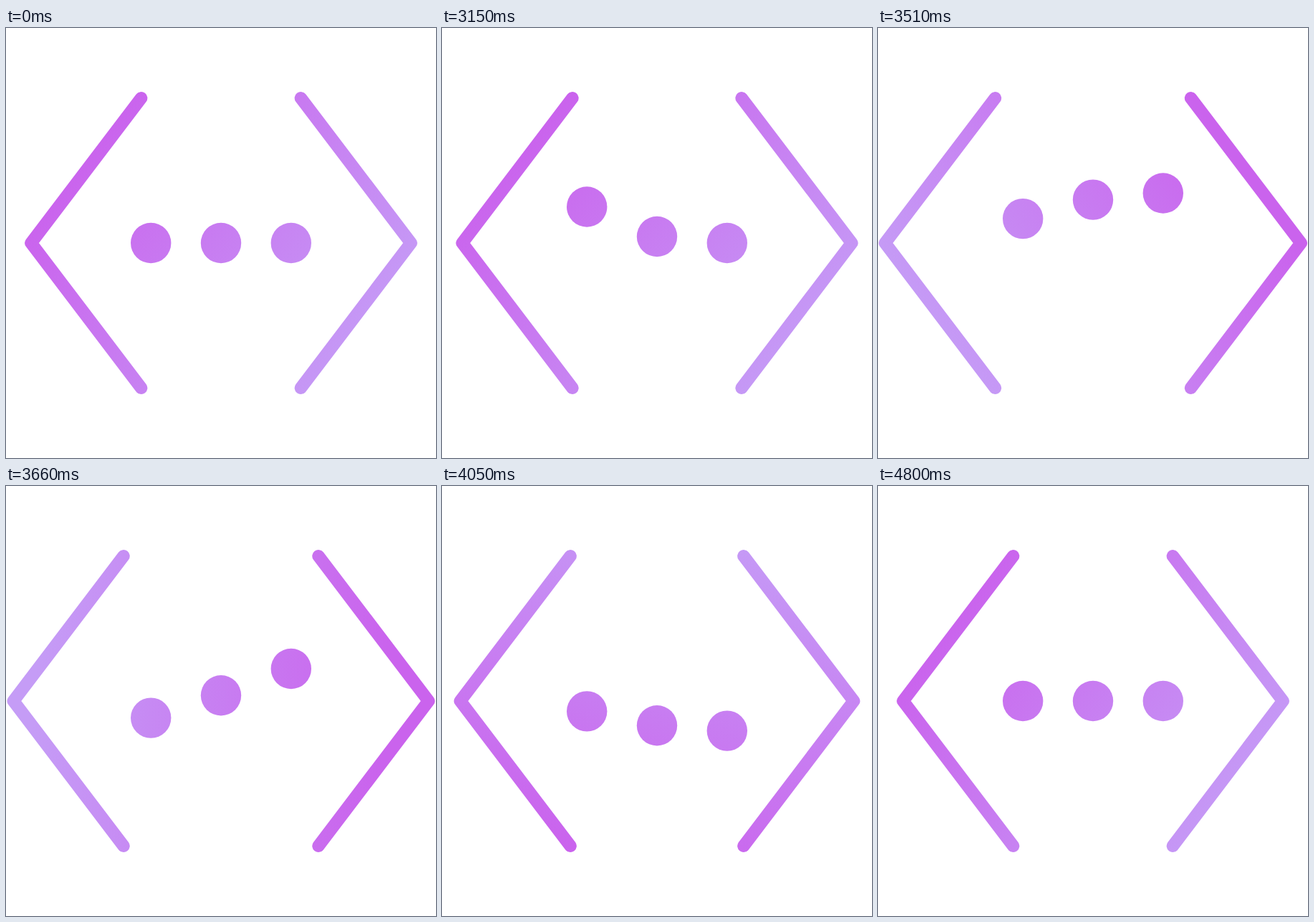
Recreate the animation shown at these times as an HTML page. Size 600 by 600 pixels, loop 4.83 s.

```html
<!DOCTYPE html>
<html lang="en">
<head>
<meta charset="utf-8">
<title>Code brackets</title>
<style>
  html, body { margin: 0; width: 100%; height: 100%; overflow: hidden; background: #fff; }
  svg { display: block; width: 100vw; height: 100vh; }
  path { fill: none; stroke: url(#tint); stroke-width: 17.5; stroke-linecap: round; stroke-linejoin: round; }
  circle { fill: url(#tint); }
</style>
</head>
<body>
<svg viewBox="0 0 600 600">
  <defs>
    <linearGradient id="tint" gradientUnits="userSpaceOnUse" x1="70" y1="300" x2="560" y2="300">
      <stop offset="0" stop-color="#ca63ed"/>
      <stop offset="1" stop-color="#c59cf6"/>
    </linearGradient>
  </defs>
  <path id="left"/>
  <path id="right"/>
  <circle cx="202.2" cy="300" r="28.2"/>
  <circle cx="300" cy="300" r="28.2"/>
  <circle cx="397.8" cy="300" r="28.2"/>
</svg>
<script>
  const LOOP = 4830, HOLD = 3000, STEP = 30;
  const DOT_DELAY = 3;

  // Keys: [step, value, x1, x2]; x1 and x2 ease the way to the next key.
  const BOUNCE = [
    [0, 0, 0.38, 0.3],
    [10, -70, 0.5, 0.43],
    [28, 42, 0.51, 0.5],
    [42, -14, 0.5, 0.5],
    [54, 0]
  ];
  const SPREAD = [
    [0, 0, 0.4, 0.27],
    [18, 25.2, 0.4, 0.2],
    [60, 0]
  ];
  // Keys: [step, gradient angle in degrees]
  const TURN = [[0, 37], [9, 63], [17, 145], [27, 221], [44, 350], [60, 397]];

  const left = document.getElementById('left');
  const right = document.getElementById('right');
  const tint = document.getElementById('tint');
  const dots = document.querySelectorAll('circle');

  // cubic-bezier(x1, 0, x2, 1), solved by bisection
  function ease(t, x1, x2) {
    let lo = 0, hi = 1, s = 0.5;
    for (let i = 0; i < 24; i++) {
      s = (lo + hi) / 2;
      const r = 1 - s;
      const x = 3 * r * r * s * x1 + 3 * r * s * s * x2 + s * s * s;
      if (x < t) lo = s; else hi = s;
    }
    return s * s * (3 - 2 * s);
  }

  function valueAt(keys, n) {
    if (n <= keys[0][0]) return keys[0][1];
    const i = keys.findIndex(k => k[0] > n);
    if (i < 0) return keys[keys.length - 1][1];
    const [n0, v0, x1, x2] = keys[i - 1];
    const [n1, v1] = keys[i];
    return v0 + (v1 - v0) * ease((n - n0) / (n1 - n0), x1, x2);
  }

  function slope(keys, i) {
    if (i === 0 || i === keys.length - 1) return 0;
    const a = keys[i - 1], b = keys[i + 1];
    return (b[1] - a[1]) / (b[0] - a[0]);
  }

  // Smooth Hermite curve through the keys
  function curveAt(keys, n) {
    const i = keys.findIndex(k => k[0] > n);
    if (i < 0) return keys[keys.length - 1][1];
    const [n0, v0] = keys[i - 1], [n1, v1] = keys[i];
    const d = n1 - n0, t = (n - n0) / d, r = 1 - t;
    return v0 * r * r * (1 + 2 * t) + v1 * t * t * (3 - 2 * t)
      + d * t * r * (slope(keys, i - 1) * r - slope(keys, i) * t);
  }

  function bracket(end, apex) {
    return `M${end} 97.8L${apex} 300L${end} 502.2`;
  }

  function draw(time) {
    const n = Math.max(0, Math.floor((time % LOOP - HOLD) / STEP));

    const shift = valueAt(SPREAD, n);
    left.setAttribute('d', bracket(188.6 - shift, 35 - shift));
    right.setAttribute('d', bracket(411.4 + shift, 565 + shift));

    dots.forEach((dot, i) => {
      dot.setAttribute('cy', 300 + valueAt(BOUNCE, n - i * DOT_DELAY));
    });

    tint.setAttribute('gradientTransform', `rotate(${curveAt(TURN, n)} 300 300)`);
  }

  const start = performance.now();
  function tick() {
    draw(performance.now() - start);
    requestAnimationFrame(tick);
  }
  tick();
</script>
</body>
</html>
```
